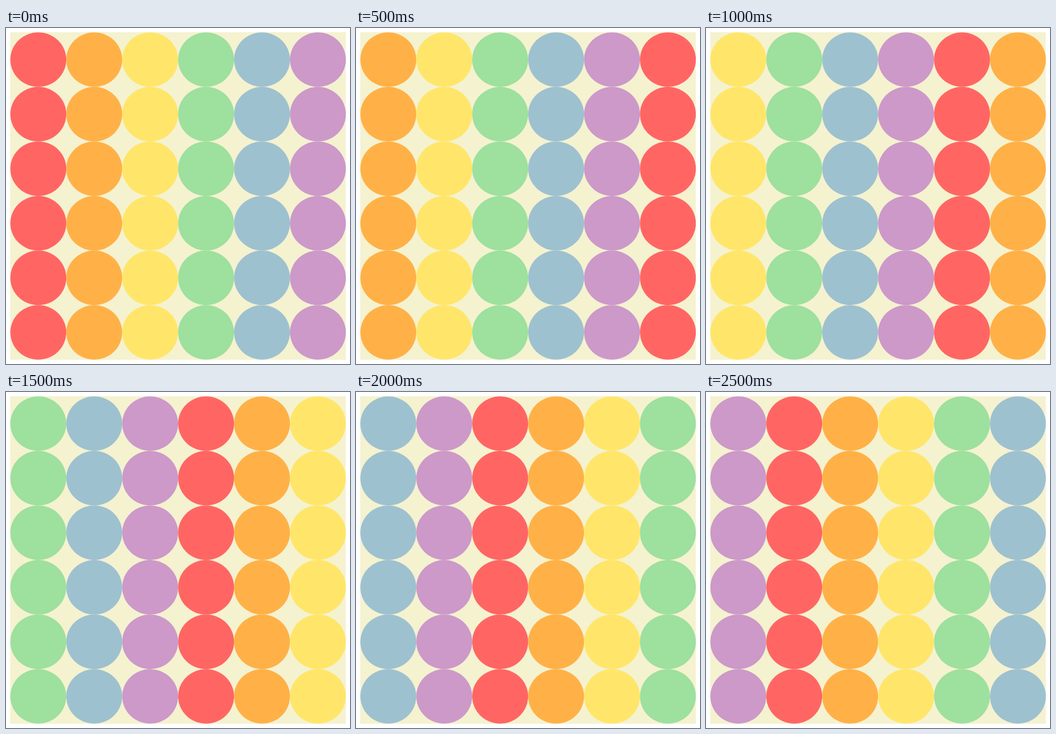
An HTML page that plays this animation: 572 by 558 pixels, repeating every 3 s.

```html
<!DOCTYPE html>
<html lang="en">
<head>
<meta charset="utf-8">
<title>Rainbow dots</title>
<style>
html, body { margin: 0; width: 100%; height: 100%; overflow: hidden; background: #fff; }
svg { display: block; width: 572px; height: 558px; }
</style>
</head>
<body>
<svg id="stage" viewBox="0 0 572 558">
  <clipPath id="panel"><rect x="7" y="7" width="558" height="544"/></clipPath>
  <rect x="7" y="7" width="558" height="544" fill="#f5f2d0"/>
  <g id="dots" clip-path="url(#panel)"></g>
</svg>
<script>
const COLORS = ['#ff6663', '#ffb147', '#ffe66a', '#9ee09e', '#9ec1cf', '#cc99c9'];
const N = COLORS.length;
const STEP = 500;
const PAD = 7.2, CELL_W = 93, CELL_H = 90.6;
const NS = 'http://www.w3.org/2000/svg';

function add(parent, tag, attrs = {}) {
  const el = document.createElementNS(NS, tag);
  for (const key in attrs) el.setAttribute(key, attrs[key]);
  return parent.appendChild(el);
}

const dots = document.getElementById('dots');
const columns = COLORS.map((_, col) => {
  const group = add(dots, 'g');
  for (let row = 0; row < N; row++) {
    add(group, 'ellipse', {
      cx: PAD + CELL_W * (col + 0.5),
      cy: PAD + CELL_H * (row + 0.5),
      rx: CELL_W / 2,
      ry: CELL_H / 2
    });
  }
  return group;
});

// Colours hop one column to the left on every step.
function draw(ms) {
  const shift = Math.floor(ms / STEP) % N;
  columns.forEach((group, col) => group.setAttribute('fill', COLORS[(col + shift) % N]));
}

const start = performance.now();
function tick() {
  draw(performance.now() - start);
  requestAnimationFrame(tick);
}
tick();
</script>
</body>
</html>
```
